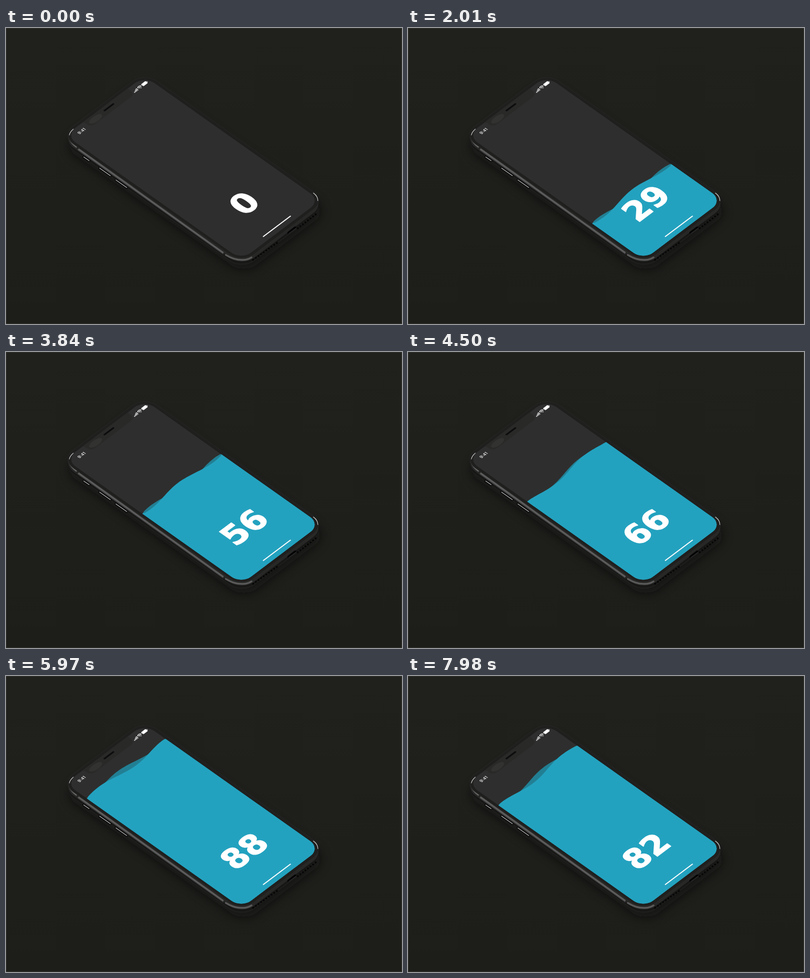
Animation of 800 by 600 pixels, one loop 8000 ms. Source, as an HTML page:

```html
<!DOCTYPE html>
<html lang="en">
<head>
<meta charset="utf-8">
<title>Liquid counter</title>
<style>
  html, body { margin: 0; width: 100%; height: 100%; overflow: hidden; background: #1f1f1c; }
  svg { display: block; width: 100%; height: 100%; }
  #count { font: 700 120px "DejaVu Sans", sans-serif; fill: #fff; stroke: #fff; stroke-width: 3; stroke-linejoin: round; }
  #clock { font: 500 16px Inter, sans-serif; fill: #fff; }
  .line { fill: none; stroke-linecap: round; }
</style>
</head>
<body>
<svg viewBox="0 0 800 600">
  <defs>
    <linearGradient id="backdrop" x1="0" y1="0" x2="0" y2="1">
      <stop offset="0" stop-color="#20201d"/>
      <stop offset="1" stop-color="#1d1d1a"/>
    </linearGradient>
    <filter id="blur" x="-20%" y="-20%" width="140%" height="140%"><feGaussianBlur stdDeviation="11"/></filter>
    <clipPath id="screen"><rect x="-2" width="374" height="812" rx="47"/></clipPath>
    <!-- The phone face is a 375 by 812 plane laid flat by one affine map. -->
    <g id="slab"><rect x="-12" y="-11" width="396" height="835" rx="58" transform="matrix(.4267 -.3227 .4384 .311 120.7 217)"/></g>
  </defs>

  <rect width="800" height="600" fill="url(#backdrop)"/>
  <rect x=".5" y=".5" width="799" height="599" fill="none" stroke="#343431"/>
  <use href="#slab" x="4" y="22" fill="#0b0b0a" opacity=".65" filter="url(#blur)"/>
  <g id="sides"></g>

  <g class="line">
    <path d="M146 245.500L439 456" stroke="#5d5d5d" stroke-width="4" stroke-linecap="butt"/>
    <path d="M146 248L439 458.500" stroke="#3a3a3a" stroke-width="1.500"/>
    <path d="M129 225Q132 234 142 241" stroke="#6a6a6a" stroke-width="3"/>
    <path d="M444 460Q462 471 479 470Q488 470 496 465" stroke="#5a5a5a" stroke-width="3.500"/>
    <path d="M157 261.500L168 269M189 284L211 299.500M222 308L244 323.500" stroke="#0c0c0c" stroke-width="5"/>
    <path d="M157 261.500L168 269M189 284L211 299.500M222 308L244 323.500" stroke="#c0c0c0" stroke-width="1.200"/>
    <path d="M499 470L551 433M589 406L628 376" stroke="#070707" stroke-width="3.500" stroke-dasharray="1 5.500"/>
    <path d="M571 415L584 405" stroke="#050505" stroke-width="5"/>
    <path d="M571 417L586 406" stroke="#444" stroke-width="1"/>
  </g>

  <use href="#slab" fill="#1f1f1e" stroke="#2e2e2d"/>
  <g class="line">
    <path d="M128 217Q129 211 136 205" stroke="#c8c8c8" stroke-width="1.200"/>
    <path d="M621 334.500Q630 341 630 350" stroke="#d8d8d8" stroke-width="1.200"/>
  </g>

  <g transform="matrix(.4267 -.3227 .4384 .311 120.7 217)">
    <g clip-path="url(#screen)">
      <rect x="-2" width="374" height="812" fill="#2e2e2e"/>
      <path id="back" fill="#227f93"/>
      <path id="front" fill="#23a2bf"/>
      <path d="M76 -2Q83 0 83 9V13Q83 35 105 35H270Q292 35 292 13V9Q292 0 299 -2Z" fill="#292928"/>
      <ellipse cx="121" cy="20" rx="28" ry="12" fill="#323231"/>
      <rect x="164" y="11" width="50" height="8" rx="4" fill="#0d0d0d" stroke="#343433"/>
    </g>
    <text id="clock" x="49" y="31" text-anchor="middle">9:41</text>
    <g fill="#fff">
      <path d="M295 31v-4h3v4zM300 31v-6h3v6zM305 31v-9h3v9zM310 31v-11h3v11z"/>
      <rect x="336" y="19" width="22" height="12" rx="3"/>
      <path d="M359 23h2v4h-2z"/>
    </g>
    <path class="line" d="M317 23Q325 16 333 23M320 26.500Q325 22 330 26.500M324 30h2" stroke="#fff" stroke-width="2.500"/>
    <rect x="122" y="788" width="132" height="4" rx="2" fill="#fff"/>
    <text id="count" x="187.500" y="682" text-anchor="middle">0</text>
  </g>
</svg>

<script>
  const find = id => document.getElementById(id);
  const [back, front, count] = ['back', 'front', 'count'].map(find);
  const WIDTH = 375, HEIGHT = 812, LOOP = 8000;
  const PEAK = 6790, MS_PER_PERCENT = 67.5, WAVE_PERIOD = 890;

  // Stacked copies of the slab give the phone its thickness.
  for (let depth = 14; depth > 0; depth--) {
    const layer = document.createElementNS('http://www.w3.org/2000/svg', 'use');
    layer.setAttribute('href', '#slab');
    layer.setAttribute('y', depth);
    layer.setAttribute('fill', depth > 11 ? '#1e1e1d' : depth > 7 ? '#171716' : '#282827');
    find('sides').append(layer);
  }

  // A travelling sine whose ends stay pinned to the screen edges.
  function liquid(level, phase) {
    let path = `M-2 ${HEIGHT}V${level}`;
    for (let i = 0; i <= 50; i++) {
      const s = i / 50;
      const rise = 13 * Math.sqrt(Math.abs(Math.sin(Math.PI * s))) * Math.sin(2 * Math.PI * s - phase);
      path += `L${s * WIDTH} ${(level - rise).toFixed(2)}`;
    }
    return path + `V${HEIGHT}Z`;
  }

  function draw(time) {
    const percent = Math.max(0, 100 - Math.abs(time - PEAK) / MS_PER_PERCENT);
    const level = HEIGHT * (1 - percent / 100);
    const turn = (time - 5310) / WAVE_PERIOD;
    const phase = Math.PI * (1.27 - 2 * turn - .08 * (1 - Math.cos(2 * Math.PI * turn)));
    const visible = time >= 60;
    front.setAttribute('d', visible ? liquid(level, phase) : '');
    back.setAttribute('d', visible ? liquid(level, -phase) : '');
    count.textContent = Math.round(percent);
  }

  function frame() {
    const time = performance.now() % LOOP;
    draw(Math.floor(time / 30) * 30);
    requestAnimationFrame(frame);
  }
  frame();
</script>
</body>
</html>
```
